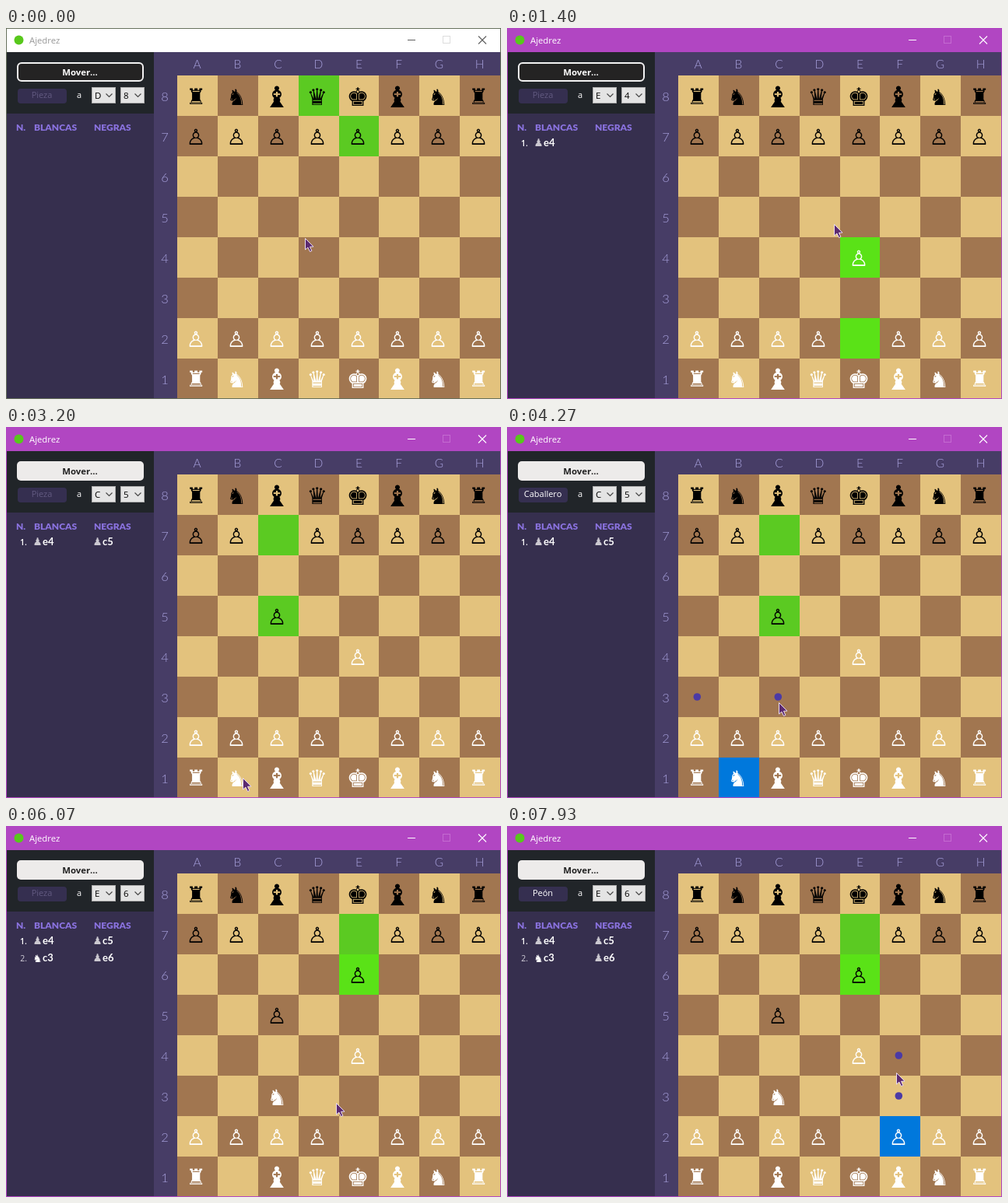
Recreate the animation shown at these times as an HTML page with a canvas. Size 636x477 px, loop 8 s.

```html
<!DOCTYPE html>
<html lang="es">
<head>
<meta charset="utf-8">
<title>Ajedrez</title>
<style>
  html, body { margin: 0; width: 100%; height: 100%; overflow: hidden; }
  canvas { display: block; }
</style>
</head>
<body>
<canvas id="stage" width="636" height="477"></canvas>
<script>
const ctx = document.getElementById('stage').getContext('2d');
const LOOP = 8000, STEP = 200 / 3;
const SANS = '"Open Sans", "Noto Sans", sans-serif';
const LATO = 'Lato, sans-serif';

// Glyph and the box its ink fits into.
const PIECES = {
  R: ['♜', 20, 21], N: ['♞', 21, 21], B: ['♝', 19, 28],
  Q: ['♛', 25, 22], K: ['♚', 23, 24], P: ['♙', 17, 23]
};

const EVENTS = [
  { at: 470, pick: 'e2', dots: ['e3', 'e4'], name: 'Peón' },
  { at: 1130, from: 'e2', to: 'e4', icon: '♟', light: false },
  { at: 2000, pick: 'c7', dots: ['c6', 'c5'], name: 'Peón' },
  { at: 2870, from: 'c7', to: 'c5', icon: '♟', light: true },
  { at: 3470, pick: 'b1', dots: ['a3', 'c3'], name: 'Caballero' },
  { at: 4470, from: 'b1', to: 'c3', icon: '♞', light: false },
  { at: 5470, pick: 'e7', dots: ['e6', 'e5'], name: 'Peón' },
  { at: 5800, from: 'e7', to: 'e6', icon: '♟', light: true },
  { at: 7330, pick: 'f2', dots: ['f3', 'f4'], name: 'Peón' }
];

// Pointer path: time, x, y.
const POINTER = [
  [0, 384, 270], [470, 449, 394], [600, 450, 393], [870, 455, 341],
  [1070, 454, 299], [1200, 453, 297], [1730, 353, 162], [1990, 355, 149],
  [2200, 355, 149], [2730, 350, 247], [2870, 350, 247], [3200, 304, 451],
  [3600, 304, 451], [4270, 349, 354], [4470, 349, 354], [4930, 439, 150],
  [5070, 439, 150], [5270, 553, 76], [5450, 454, 145], [5600, 452, 190],
  [5800, 452, 190], [6070, 424, 356], [6600, 494, 398], [6670, 494, 398],
  [6930, 495, 404], [7400, 495, 404], [7930, 500, 317], [8000, 500, 317]
];

function pointerAt(time) {
  const next = Math.max(1, POINTER.findIndex(key => key[0] >= time));
  const [t0, x0, y0] = POINTER[next - 1], [t1, x1, y1] = POINTER[next];
  const u = (time - t0) / (t1 - t0), ease = u * u * (3 - 2 * u);
  return [x0 + (x1 - x0) * ease, y0 + (y1 - y0) * ease];
}

function stateAt(time) {
  const board = {};
  [...'abcdefgh'].forEach((file, i) => {
    board[file + 8] = ['RNBQKBNR'[i], '#000'];
    board[file + 7] = ['P', '#000'];
    board[file + 2] = ['P', '#fff'];
    board[file + 1] = ['RNBQKBNR'[i], '#fff'];
  });
  const state = {
    board, active: time >= EVENTS[0].at, marked: ['d8', 'e7'], moves: [],
    pick: null, dots: [], name: 'Pieza', light: false, last: 'd8'
  };
  for (const event of EVENTS) {
    if (event.at > time) break;
    if (event.pick) {
      Object.assign(state, { pick: event.pick, dots: event.dots, name: event.name });
      continue;
    }
    board[event.to] = board[event.from];
    delete board[event.from];
    state.moves.push(event);
    Object.assign(state, {
      marked: [event.from, event.to], last: event.to, light: event.light,
      pick: null, dots: [], name: 'Pieza'
    });
  }
  return state;
}

function rect(x, y, w, h, color) {
  ctx.fillStyle = color;
  ctx.fillRect(x, y, w, h);
}

function round(x, y, w, h, r, fill, stroke, line = 1) {
  ctx.beginPath();
  ctx.roundRect(x, y, w, h, r);
  ctx.fillStyle = fill;
  ctx.fill();
  if (stroke) {
    ctx.strokeStyle = stroke;
    ctx.lineWidth = line;
    ctx.stroke();
  }
}

function text(string, x, y, font, color, align = 'left') {
  ctx.font = font;
  ctx.fillStyle = color;
  ctx.textAlign = align;
  ctx.fillText(string, x, y);
}

function path(points, color, width = 1) {
  ctx.beginPath();
  points.forEach(([x, y]) => ctx.lineTo(x, y));
  ctx.strokeStyle = color;
  ctx.lineWidth = width;
  ctx.stroke();
}

const glyphFont = size => `${size}px "DejaVu Sans", sans-serif`;
const inkCache = {};

function inkOf(char) {
  if (!inkCache[char]) {
    ctx.font = glyphFont(100);
    ctx.textAlign = 'left';
    inkCache[char] = ctx.measureText(char);
  }
  return inkCache[char];
}

// Centres the ink of a glyph on a point, as large as the box allows.
function glyph([char, w, h], cx, cy, color) {
  const { actualBoundingBoxLeft: left, actualBoundingBoxRight: right,
    actualBoundingBoxAscent: up, actualBoundingBoxDescent: down } = inkOf(char);
  const scale = Math.min(w / (left + right), h / (up + down));
  text(char, cx - (right - left) / 2 * scale, cy + (up - down) / 2 * scale,
    glyphFont(100 * scale), color);
}

const columnX = i => 220 + 52 * i - (i > 4 ? 1 : 0);
const rowY = i => 61 + 52 * i;

function drawTitleBar(active) {
  const ink = active ? '#fff' : '#5f5f5f';
  rect(0, 0, 636, 477, active ? '#b146c2' : '#66705c');
  rect(1, 1, 634, 30, active ? '#b146c2' : '#fff');
  ctx.beginPath();
  ctx.arc(16.5, 15.5, 6, 0, 7);
  ctx.fillStyle = '#58c81c';
  ctx.fill();
  text('Ajedrez', 30, 20, `11.3px ${SANS}`, active ? '#fff' : '#999');
  path([[516, 15.5], [526, 15.5]], ink);
  ctx.strokeStyle = active ? '#c46bd1' : '#ddd';
  ctx.strokeRect(561.5, 10.5, 9, 9);
  path([[607, 10.5], [617, 20.5]], ink, 1.1);
  path([[617, 10.5], [607, 20.5]], ink, 1.1);
}

function drawCombo(x, value) {
  rect(x, 76, 31, 21, '#adadad');
  rect(x + 1, 77, 29, 19, '#e4e4e4');
  text(value, x + 4, 91, `11.5px ${SANS}`, '#000');
  path([[x + 18.5, 84.5], [x + 22.5, 88.5], [x + 26.5, 84.5]], '#444', 1.1);
}

function drawPanel({ light, name, last, moves }) {
  rect(1, 31, 189, 79, '#212529');
  rect(1, 110, 189, 366, '#362f4e');
  if (light) round(14, 44, 163, 25, 5, '#edebea');
  else round(15, 45, 161, 23, 5, '#242323', '#f2f2f2', 2);
  text('Mover...', 95, 61, `bold 11.4px ${SANS}`, light ? '#222' : '#fff', 'center');

  round(15, 78, 63, 19, 4, '#352f50');
  text(name, 46, 90, `11px ${SANS}`, name === 'Pieza' ? '#625a80' : '#fff', 'center');
  text('a', 94, 90, `11px ${SANS}`, '#fff', 'center');
  drawCombo(110, last[0].toUpperCase());
  drawCombo(147, last[1]);

  [['N.', 13], ['BLANCAS', 36], ['NEGRAS', 113]].forEach(([label, x]) =>
    text(label, x, 132, `900 12px ${LATO}`, '#8a72df'));
  moves.forEach(({ icon, to }, i) => {
    const row = i >> 1, x = i % 2 ? 113 : 36, y = 148 + 22 * row;
    if (i % 2 === 0) {
      text(row + 1 + '.', 27, y + 4, `${row ? 400 : 600} 10.5px ${SANS}`,
        row ? '#d2cfda' : '#fff', 'right');
    }
    glyph([icon, 10, 10], x + 4.5, y - 0.5, icon === '♞' ? '#fff' : '#cbc8d0');
    text(to, x + 11, y + 4, `bold 13px ${LATO}`, '#fff');
  });
}

function drawBoard({ board, marked, pick, dots }) {
  rect(190, 31, 445, 445, '#473d66');
  for (let i = 0; i < 8; i++) {
    text('ABCDEFGH'[i], columnX(i) + 25.5, 52, `300 15.5px ${LATO}`, '#a69fdb', 'center');
    text(8 - i, 204, rowY(i) + 33, `300 16.5px ${LATO}`, '#a69fdb', 'center');
  }
  for (let row = 0; row < 8; row++) {
    for (let col = 0; col < 8; col++) {
      const square = 'abcdefgh'[col] + (8 - row), dark = (row + col) % 2;
      const x = columnX(col), y = rowY(row);
      let color = dark ? '#a17650' : '#e3c27d';
      if (marked.includes(square)) color = (square === 'd8' || dark) ? '#5bca22' : '#5ae217';
      if (square === pick) color = '#0078dc';
      rect(x, y, columnX(col + 1) - x, Math.min(rowY(row + 1), 476) - y, color);
      if (board[square]) {
        const [kind, ink] = board[square];
        glyph(PIECES[kind], x + 24, y + (row === 7 ? 26 : 27), square === pick ? '#fff' : ink);
      }
      if (dots.includes(square)) {
        ctx.beginPath();
        ctx.arc(x + 24.3, y + 26, 4.8, 0, 7);
        ctx.fillStyle = '#4b3aa6';
        ctx.fill();
      }
    }
  }
}

function drawPointer([x, y]) {
  ctx.save();
  ctx.translate(Math.round(x) + 0.5, Math.round(y) + 0.5);
  ctx.beginPath();
  [[0, 0], [0, 14.5], [3.4, 11.6], [6, 17], [8.4, 16], [6, 10.8], [10.5, 10.6]]
    .forEach(([px, py]) => ctx.lineTo(px, py));
  ctx.closePath();
  ctx.fillStyle = '#5b2a70';
  ctx.fill();
  ctx.strokeStyle = '#eadcf0';
  ctx.lineWidth = 1;
  ctx.stroke();
  ctx.restore();
}

function draw(time) {
  const state = stateAt(time);
  drawTitleBar(state.active);
  drawPanel(state);
  drawBoard(state);
  drawPointer(pointerAt(time));
}

function tick() {
  const time = performance.now() % LOOP;
  draw(Math.min(Math.floor((time + 4) / STEP) * STEP + 4, LOOP));
  requestAnimationFrame(tick);
}
tick();
</script>
</body>
</html>
```
